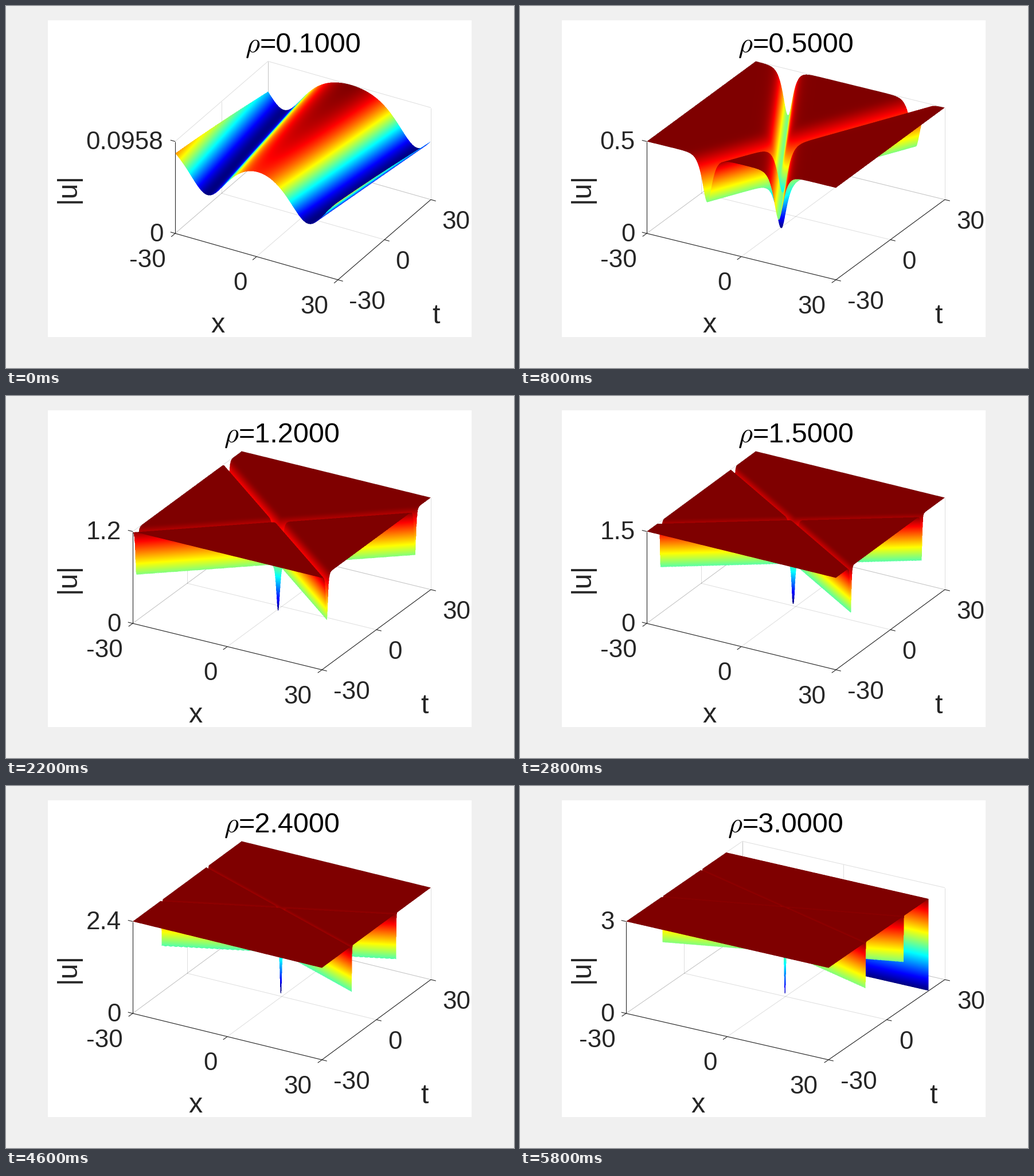
A matplotlib script for the animation above (6 s loop, 886 by 632 pixels).

```python
import numpy as np
import matplotlib.pyplot as plt
from matplotlib.animation import FuncAnimation
from matplotlib.collections import LineCollection
from matplotlib.patches import Rectangle

plt.rcParams["font.family"] = "Liberation Sans"
plt.rcParams["mathtext.fontset"] = "cm"

W, H, DPI = 886, 632, 100
FRAMES, STEP_MS = 30, 200
INK = "#262626"
TICK_PX, LABEL_PX = 44, 48.5

GRID = np.linspace(-30, 30, 601)
RIGHT, FLOOR = 741, 397          # right end of the box, floor height of its left corner
X_DROP, T_RISE, Z_RISE = 81, 140, 160.5
LEFT, TOP, WIDE, TALL = 180, 80, 564, 410   # image window of the surface
SS = 2                           # supersampling


class Box:
    """Parallel projection of the unit cube for one axes layout."""

    def __init__(self, x0, a, x_pad, t_pad, x_name, t_name):
        self.x0, self.a, self.b = x0, a, RIGHT - x0 - a
        self.x_pad, self.t_pad = x_pad, t_pad
        self.x_name, self.t_name = x_name, t_name

    def at(self, s, r, h):
        return np.array([self.x0 + self.a * s + self.b * r,
                         FLOOR + X_DROP * s - T_RISE * r - Z_RISE * h])


# layouts by the length of the upper z tick label
BOXES = {1: Box(185, 353, 18.2, 21.3, 310.7, 721.5),
         3: Box(221, 330, 17.2, 20, 330.7, 730.5),
         6: Box(295, 284, 16.2, 19, 369.7, 750.5)}


def two_solitons(rho, x, t):
    """|u| of two colliding dark solitons; t is a column of rising times."""
    k = np.sqrt(3) * rho
    with np.errstate(all="ignore"):
        e1 = np.exp(k * (rho * t - x + 4)) / k
        e2 = np.exp(k * (rho * t + x + 3)) / k
        one, two = e1 + e2, 4 * e1 * e2
        den = 1 + one + two
        p, q = one / den, two / den
        z = rho * np.sqrt((1 - 1.5 * (p + q)) ** 2 + 0.75 * (p - q) ** 2)
    # the product term overflows at late times
    power = 2 * k * rho * t[:, 0] + 7 * k + np.log(4 / k ** 2)
    over = np.flatnonzero(power > np.log(np.finfo(float).max))
    z[over] = np.nan
    z[over[:1]] = 0
    return z


def jet(v):
    return np.stack([np.clip(1.5 - abs(4 * v - c), 0, 1) for c in (3, 2, 1)], -1)


def render(rho, low, top, box):
    """Scan each pixel column from back to front and fill between samples."""
    cols = LEFT + (np.arange(WIDE * SS) + 0.5) / SS
    rows = max(601, int(360 * rho ** 2) + 1)     # steeper valleys need finer steps
    r = np.linspace(0, 1, rows)[:, None]
    s = (cols - box.x0 - box.b * r) / box.a
    h = two_solitons(rho, 60 * np.clip(s, 0, 1) - 30, 60 * r - 30)
    h[(s < 0) | (s > 1)] = np.nan
    q = (box.at(s, r, h / top)[1] - TOP) * SS - 0.5
    h, q = h[::-1], q[::-1]

    edge = np.ceil(q)
    start = np.minimum(edge[:-1], edge[1:])
    count = np.nan_to_num(abs(edge[1:] - edge[:-1])).astype(int).ravel()
    seg = np.flatnonzero(count)
    n = count[seg]
    seg = np.repeat(seg, n)
    pix = start.ravel()[seg].astype(int) + np.arange(n.sum()) - np.repeat(np.cumsum(n) - n, n)
    q0, q1 = q[:-1].ravel()[seg], q[1:].ravel()[seg]
    h0, h1 = h[:-1].ravel()[seg], h[1:].ravel()[seg]

    img = np.full((TALL * SS, WIDE * SS), np.nan)
    img[pix, seg % (WIDE * SS)] = h0 + (h1 - h0) * (pix - q0) / (q1 - q0)

    alpha = (~np.isnan(img))[..., None].astype(float)
    v = np.clip(np.nan_to_num((img - low) / (top - low)), 0, 1)
    rgba = np.concatenate([jet(v) * alpha, alpha], -1)
    rgba = rgba.reshape(TALL, SS, WIDE, SS, 4).mean(axis=(1, 3))
    rgba[..., :3] /= np.maximum(rgba[..., 3:], 1e-9)
    return np.clip(rgba, 0, 1)


def grid_lines(box):
    lines = []
    for v in (0, 0.5, 1):
        lines += [((v, 0, 0), (v, 1, 0)), ((0, v, 0), (1, v, 0)),
                  ((v, 1, 0), (v, 1, 1)), ((0, v, 0), (0, v, 1))]
    for v in (0, 1):
        lines += [((0, 1, v), (1, 1, v)), ((0, 0, v), (0, 1, v))]
    return [[box.at(*p), box.at(*e)] for p, e in lines]


def axis_lines(box):
    corner = box.at(0, 0, 0)
    lines = [[corner, box.at(0, 0, 1)], [corner, box.at(1, 0, 0)],
             [box.at(1, 0, 0), box.at(1, 1, 0)]]
    along_x = np.array([box.a, X_DROP]) / np.hypot(box.a, X_DROP)
    along_t = np.array([box.b, -T_RISE]) / np.hypot(box.b, T_RISE)
    for v in (0, 0.5, 1):
        for p, d in ((box.at(v, 0, 0), -along_t), (box.at(1, v, 0), along_x)):
            lines.append([p, p + 9 * d])
    for v in (0, 1):
        p = box.at(0, 0, v)
        lines.append([p, p - 8.5 * along_x])
    return lines


fig = plt.figure(figsize=(W / DPI, H / DPI), dpi=DPI, facecolor="#f0f0f0")
ax = fig.add_axes([0, 0, 1, 1])
ax.axis("off")
ax.add_patch(Rectangle((73, 25), 739, 553, fc="white", ec="none", zorder=0))
grid = ax.add_collection(LineCollection([], colors=INK, alpha=0.15, lw=0.72, zorder=1))
axes = ax.add_collection(LineCollection([], colors=INK, lw=0.8, zorder=2))
surf = ax.imshow(np.zeros((TALL, WIDE, 4)), interpolation="nearest", zorder=3,
                 extent=(LEFT, LEFT + WIDE, TOP + TALL, TOP), aspect="auto")
ax.set_xlim(0, W)
ax.set_ylim(H, 0)


def label(text="", px=TICK_PX, ha="center", color=INK, **kw):
    return ax.text(0, 0, text, fontsize=px * 72 / DPI, ha=ha, va="baseline",
                   color=color, zorder=4, **kw)


x_ticks = [label(v, ha="right") for v in ("-30", "0", "30")]
t_ticks = [label(v, ha="left") for v in ("-30", "0", "30")]
z_ticks = [label(v, ha="right") for v in ("0", "")]
x_name, t_name = label("x", LABEL_PX), label("t", LABEL_PX)
u_name = label("|u|", LABEL_PX, rotation=90, rotation_mode="anchor")
rho_sign = label(r"$\rho$", LABEL_PX, color="black")
title = label("", LABEL_PX, ha="right", color="black")


def draw(n):
    rho = (n + 1) / 10
    z = two_solitons(rho, GRID, GRID[:, None])
    low, top = np.nanmin(z), np.nanmax(z)
    top_text = f"{round(float(top), 4):g}"
    box = BOXES.get(len(top_text), BOXES[6])

    surf.set_data(render(rho, low, top, box))
    grid.set_segments(grid_lines(box))
    axes.set_segments(axis_lines(box))

    for v, xt, tt in zip((0, 0.5, 1), x_ticks, t_ticks):
        xt.set_position(box.at(v, 0, 0) + (-box.x_pad, 59))
        tt.set_position(box.at(1, v, 0) + (box.t_pad, 51))
    z_ticks[1].set_text(top_text)
    for v, zt in enumerate(z_ticks):
        zt.set_position(box.at(0, 0, v) + (-20.5, 14))

    x_name.set_position((box.x_name, 569.5))
    t_name.set_position((box.t_name, 554))
    u_name.set_position((120.5, 317.5))
    mid = (box.x0 + RIGHT) / 2
    rho_sign.set_position((mid - 88, 81))
    title.set_text(f"={rho:.4f}")
    title.set_position((mid + 101.5, 81))
    return []


anim = FuncAnimation(fig, draw, frames=FRAMES, interval=STEP_MS,
                     init_func=lambda: [], repeat=True, repeat_delay=0)
plt.show()
```
